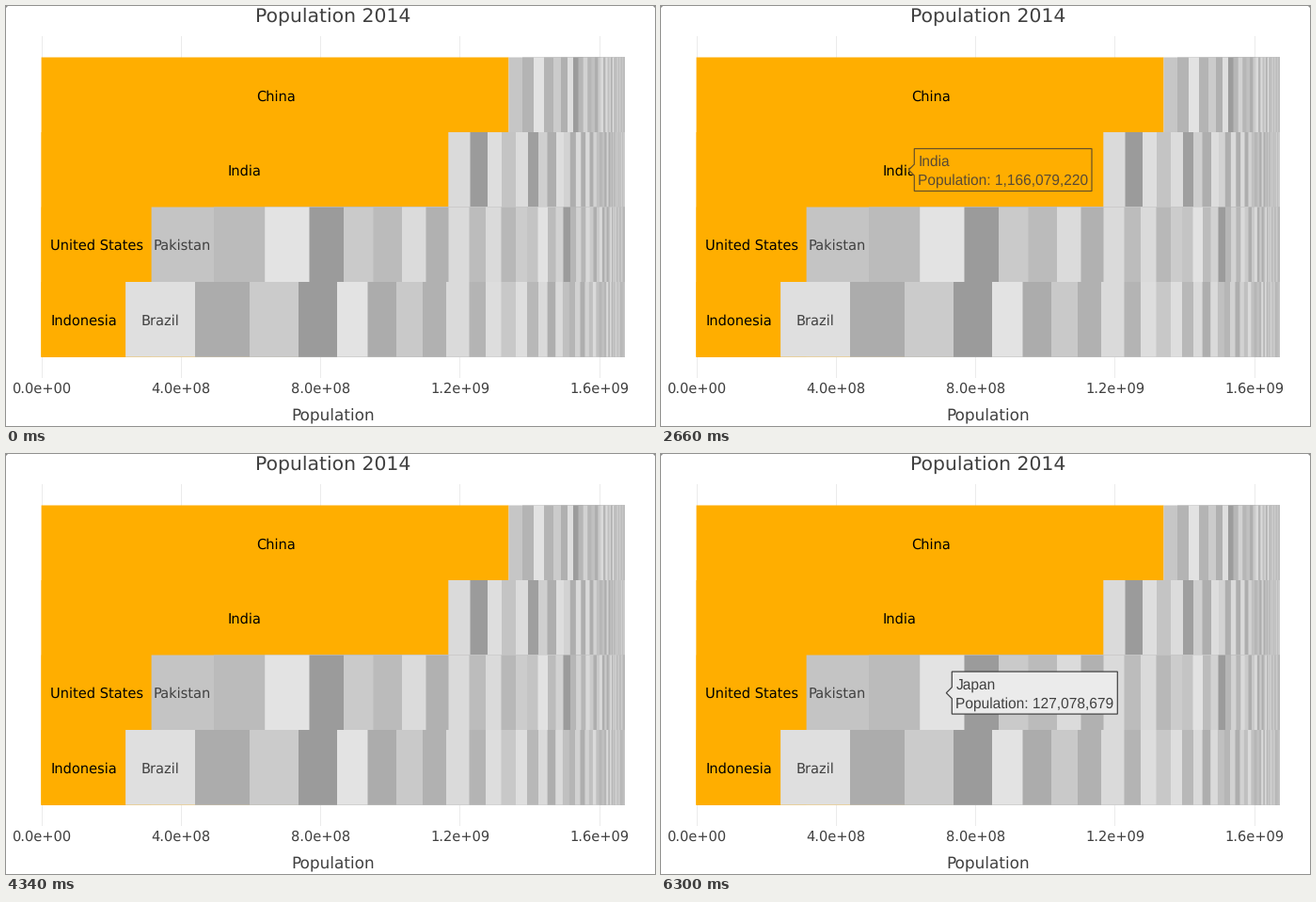
Write a matplotlib script that moves like this. It is 690x446 px and loops after 6370 ms.

```python
import random

import matplotlib.pyplot as plt
from matplotlib.animation import FuncAnimation
from matplotlib.patches import Polygon, Rectangle

W, H, DPI = 690, 446, 100
FRAMES, STEP = 91, 70
LEFT, RIGHT = 37.6, 657.6
ROW_Y = [54.5, 134, 213.5, 293, 372.7]
ORANGE, INK = "#ffae00", "#404040"

plt.rcParams["text.hinting"] = "none"
fig = plt.figure(figsize=(W / DPI, H / DPI), dpi=DPI, facecolor="white")
ax = fig.add_axes([0, 0, 1, 1])
ax.set_xlim(0, W)
ax.set_ylim(H, 0)
ax.axis("off")


def pt(px):
    return px * 72 / DPI


def grey(level):
    return f"#{level:02x}{level:02x}{level:02x}"


def write(x, y, text, size=14.6, color=INK, ha="center", font="DejaVu Sans", z=3):
    return ax.text(x, y, text, fontsize=pt(size), color=color, ha=ha,
                   va="baseline", family=font, zorder=z)


def bar(row, x, color):
    """Paint from x to the right end; later bars cover the rest."""
    top, bottom = ROW_Y[row], ROW_Y[row + 1]
    ax.add_patch(Rectangle((x, top), RIGHT - x, bottom - top, lw=0,
                           facecolor=color, snap=False, zorder=2))


# Each row: left edges and grey levels of the wider bars, then the tail's start.
ROWS = [
    ([534.5, 549, 561, 572, 582, 590, 597, 603],
     [0xC6, 0xB4, 0xE2, 0xB4, 0xCB, 0xB0, 0xDE, 0x9C], 608.5),
    ([470.3, 493.5, 512, 527, 542, 555, 566, 575.5, 585],
     [0xDA, 0x9B, 0xDE, 0xC4, 0xDC, 0x9F, 0xCF, 0xAE, 0xDD], 593),
    ([154.6, 221, 275.2, 322.5, 359, 390.5, 421, 446.5, 470.5, 492.5, 510,
      526.5, 542, 554, 565.5, 576, 584.5, 592.5],
     [0xC4, 0xBB, 0xE3, 0x9B, 0xCA, 0xBB, 0xDB, 0xB1, 0xDA, 0xBC, 0xDA,
      0xB8, 0xCC, 0xC4, 0xE2, 0xBC, 0xD2, 0x9B], 600),
    ([127.1, 201, 259, 311, 352, 384.5, 415, 443, 468, 492.5, 510, 526.5,
      542, 554],
     [0xDF, 0xAC, 0xCB, 0x9B, 0xE3, 0xAC, 0xC9, 0xB1, 0xDA, 0xB4, 0xDD,
      0xC8, 0xDE, 0xB8], 566),
]
TAIL_SHADES = [0xDA, 0xB6, 0xCA, 0xAE, 0xD2, 0xC0]

for k in range(5):
    x = 38 + 148.3 * k
    ax.add_patch(Rectangle((x - 0.5, 32), 1, 363, lw=0, facecolor="#ebebeb", zorder=1))
    label = "0.0e+00" if k == 0 else f"{4e8 * k:.1e}"
    write(x, 411, label)

rng = random.Random(4)
for row, (edges, levels, tail) in enumerate(ROWS):
    ax.add_patch(Rectangle((LEFT, ROW_Y[row]), edges[0] - LEFT,
                           ROW_Y[-1] - ROW_Y[row], lw=0, facecolor=ORANGE,
                           snap=False, zorder=2))
    for x, level in zip(edges, levels):
        bar(row, x, grey(level))
    rest, last = RIGHT - tail, levels[-1]
    while rest > 1:
        last = rng.choice([s for s in TAIL_SHADES if abs(s - last) > 9])
        bar(row, RIGHT - rest, grey(last))
        rest *= 0.895

write(347.5, 17, "Population 2014", 20.4)
write(347.5, 440, "Population", 16.9)
write(286.7, 101, "China", color="black")
write(253.5, 180, "India", color="black")
write(96.3, 259.2, "United States", color="black")
write(82.5, 338.5, "Indonesia", color="black")
write(187.5, 259.2, "Pakistan")
write(164.2, 338.5, "Brazil")

# Rounded corners of the window
for x, inward in ((0, 2), (W, -2)):
    ax.add_patch(Polygon([(x, 0), (x + inward, 0), (x, 2)], lw=0,
                         facecolor="#8a8a8a", zorder=2))


def tooltip(tip, mid, width, name, count, fill, edge, ink):
    x, top, bottom = tip + 6, mid - 22.6, mid + 22.4
    shape = Polygon([(tip, mid), (x, mid - 6), (x, top), (x + width, top),
                     (x + width, bottom), (x, bottom), (x, mid + 6)],
                    facecolor=fill, edgecolor=edge, lw=pt(1.2),
                    joinstyle="miter", zorder=5)
    ax.add_patch(shape)
    lines = [(name, -4.2), (f"Population: {count:,}", 15.8)]
    texts = [write(x + 4, mid + dy, text, 15.5, ink, "left", "Liberation Sans", 6)
             for text, dy in lines]
    return [shape, *texts]


WARM = (ORANGE, "#65502a", "#594a34")
PALE = ("#ebebeb", INK, INK)
TIPS = {
    "China": tooltip(296, 94.4, 188.7, "China", 1338612970, *WARM),
    "India": tooltip(263.3, 174.1, 188.7, "India", 1166079220, *WARM),
    "Pakistan": tooltip(192.3, 253.7, 176, "Pakistan", 176242949, *PALE),
    "Japan": tooltip(303.3, 253.7, 176, "Japan", 127078679, *PALE),
}

# Start time in ms of each hover
HOVERS = [(0, None), (490, "China"), (2660, "India"), (3570, None),
          (4480, "Pakistan"), (5670, "Japan")]


def update(frame):
    now = frame * STEP
    active = [name for start, name in HOVERS if start <= now][-1]
    for name, parts in TIPS.items():
        for part in parts:
            part.set_visible(name == active)
    return [part for parts in TIPS.values() for part in parts]


anim = FuncAnimation(fig, update, frames=FRAMES, interval=STEP, repeat=True,
                     repeat_delay=0, blit=False)
plt.show()
```
